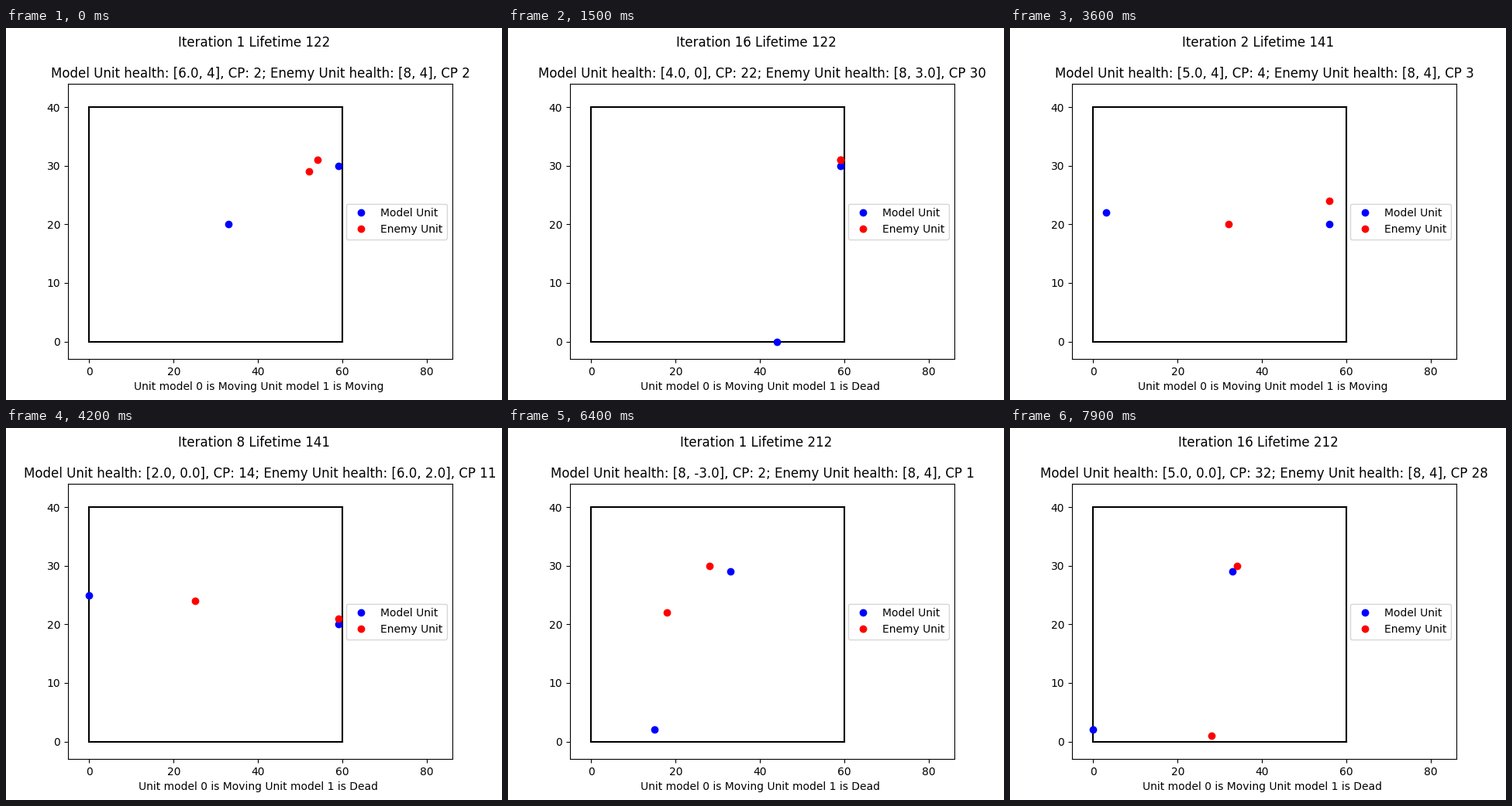
These frames come from a looping animation (640 by 480 pixels, 8 s). A matplotlib script:

```python
import matplotlib.pyplot as plt
import numpy as np
from matplotlib.animation import FuncAnimation

FRAMES, INTERVAL = 80, 100

# Waypoints are (iteration, x, y); the other tables hold (iteration, values...).
EPISODES = [
    dict(
        start=0, first=1, life=122,
        model=[[(1, 33, 20), (13, 41, 0), (16, 44, 0), (19, 46, 0), (29, 59, 32)],
               [(1, 59, 30)]],
        enemy=[[(1, 52, 29), (6, 59, 31)],
               [(1, 54, 31), (5, 59, 31), (17, 59, 31), (30, 53, 24), (34, 50, 20)]],
        points=[(1, 2, 2), (16, 22, 30), (30, 38, 57), (34, 46, 65)],
        health=[(1, "6.0, 4", "8, 4"), (3, "6.0, 2.0", "8, 4"),
                (5, "4.0, 0.0", "8, 3.0"), (12, "4.0, 0", "8, 3.0"),
                (24, "2.0, 0", "6.0, 3.0"), (29, "1.0, 0", "6.0, 3.0"),
                (31, "0.0, 0.0", "6.0, 3.0")],
        status=[(1, "Moving", "Moving"), (3, "Moving", "in Combat"),
                (5, "Moving", "Dead"), (29, "in Combat", "Dead"),
                (31, "Dead", "Dead")],
    ),
    dict(
        start=34, first=0, life=141,
        model=[[(0, 6, 20), (4, 0, 25)],
               [(0, 50, 20), (3, 59, 20)]],
        enemy=[[(0, 34, 19), (8, 25, 24), (18, 18, 28), (28, 10, 30)],
               [(0, 52, 26), (4, 59, 21)]],
        points=[(0, 0, 0), (8, 14, 11), (18, 34, 30), (28, 54, 50)],
        health=[(0, "8, 4", "8, 4"), (2, "5.0, 4", "8, 4"),
                (4, "5.0, 2.0", "6.0, 3.0"), (6, "2.0, 0.0", "6.0, 2.0"),
                (11, "2.0, 0", "6.0, 2.0"), (14, "0.0, 0", "6.0, 2.0")],
        status=[(0, "Moving", "Moving"), (4, "Moving", "in Combat"),
                (6, "Moving", "Dead"), (14, "Dead", "Dead")],
    ),
    dict(
        start=63, first=0, life=212,
        model=[[(0, 15, 5), (1, 15, 2), (7, 0, 2)],
               [(0, 33, 29)]],
        enemy=[[(0, 17, 23), (1, 18, 22), (16, 28, 1)],
               [(0, 27, 30), (1, 28, 30), (4, 34, 30)]],
        points=[(0, 0, 0), (1, 2, 1), (16, 32, 28)],
        health=[(0, "8, 4", "8, 4"), (1, "8, -3.0", "8, 4"),
                (2, "8, 0.0", "8, 4"), (6, "5.0, 0.0", "8, 4")],
        status=[(0, "Moving", "Moving"), (1, "Moving", "Dead")],
    ),
]


def between(keys, it):
    """Whole-number values interpolated between keys."""
    t, *columns = zip(*keys)
    return [int(np.rint(np.interp(it, t, c))) for c in columns]


def latest(keys, it):
    """Values of the last key reached."""
    return [k[1:] for k in keys if k[0] <= it][-1]


fig, ax = plt.subplots(figsize=(6.4, 4.8), dpi=100)
fig.subplots_adjust(left=0.125, right=0.9, bottom=0.11, top=0.85)
ax.set(xlim=(-5, 86), ylim=(-3, 44))
ax.set_xticks(range(0, 81, 20))
ax.set_yticks(range(0, 41, 10))

corners = [(0, 0), (60, 0), (60, 40), (0, 40), (0, 0)]
for (x0, y0), (x1, y1) in zip(corners, corners[1:]):
    ax.plot([x0, x1], [y0, y1], "k", lw=1.5)

models, = ax.plot([], [], "bo", label="Model Unit")
enemies, = ax.plot([], [], "ro", label="Enemy Unit")
ax.legend(loc="center right")
heading = fig.suptitle("", fontsize=12)
title = ax.set_title("", fontsize=12)
caption = ax.set_xlabel("", x=0.4956)


def draw(frame):
    ep = [e for e in EPISODES if e["start"] <= frame][-1]
    it = frame - ep["start"] + ep["first"]
    for dots, side in ((models, "model"), (enemies, "enemy")):
        dots.set_data(*zip(*(between(path, it) for path in ep[side])))
    cp, enemy_cp = between(ep["points"], it)
    hp, enemy_hp = latest(ep["health"], it)
    heading.set_text(f"Iteration {it} Lifetime {ep['life']}")
    title.set_text(f"Model Unit health: [{hp}], CP: {cp}; "
                   f"Enemy Unit health: [{enemy_hp}], CP {enemy_cp}")
    caption.set_text(" ".join(f"Unit model {i} is {s}"
                              for i, s in enumerate(latest(ep["status"], it))))
    return models, enemies, heading, title, caption


anim = FuncAnimation(fig, draw, frames=FRAMES, interval=INTERVAL,
                     repeat=True, repeat_delay=0, blit=False)
plt.show()
```
